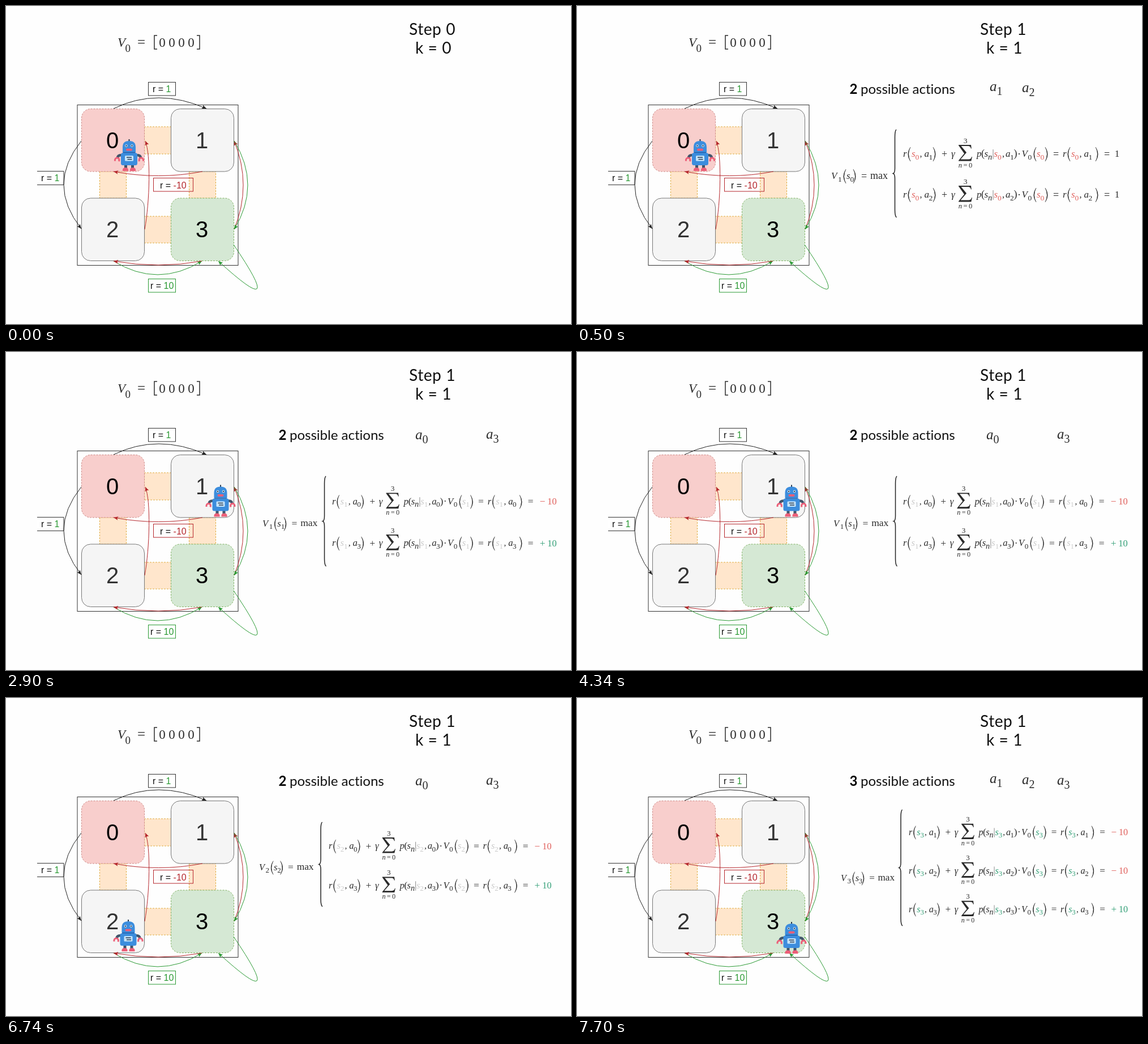
Write an HTML page that moves like this. It is 998 px wide and 561 px high and loops after 8000 ms.

```html
<!DOCTYPE html>
<html lang="en">
<head>
<meta charset="utf-8">
<title>Value iteration on a four-state grid</title>
<style>
  html, body { margin: 0; width: 100%; height: 100%; overflow: hidden; background: #fefefe; }
  svg { display: block; width: 998px; height: 561px; }
  .serif { font-family: "Liberation Serif", "Times New Roman", serif; }
  .sans { font-family: "Liberation Sans", Arial, sans-serif; }
  .geo { font-family: Lato, sans-serif; font-variant-ligatures: none; }
</style>
</head>
<body>
<svg viewBox="0 0 998 561">
  <g id="grid"></g>
  <g id="robot"></g>
  <g id="notes"></g>
</svg>
<script>
const INK = '#2b2b2b', RED = '#e0605c', GREEN = '#35a078', PALE = '#cbcbcb';
const BLACK = '#222', ARC_RED = '#b5272d', ARC_GREEN = '#2b9a34';
const LOOP = 8000;

const scenes = [
  { at: 0, step: 0, robot: [0, 0] },
  { at: 500, step: 1, robot: [0, 0], count: 2, moves: [[1, 729, 150], [2, 786, 152]],
    v: 1, s: 0, tint: RED, scale: 1, lhs: [449, 300], x: 576,
    brace: [561.5, 218, 373], rows: [[261, 1, '1'], [333, 2, '1']] },
  { at: 2900, step: 1, robot: [161.5, -0.5], count: 2, moves: [[0, 723, 154], [3, 848, 153]],
    v: 1, s: 1, tint: PALE, scale: 0.974, lhs: [453, 303], x: 576,
    brace: [562.5, 219, 378], rows: [[264, 0, '−10'], [337.5, 3, '+10']] },
  { at: 5300, step: 1, robot: [-1.5, 156], count: 2, moves: [[0, 723, 154], [3, 848, 153]],
    v: 2, s: 2, tint: PALE, scale: 0.966, lhs: [447, 299], x: 570,
    brace: [556, 219, 368], rows: [[261.5, 0, '−10'], [331, 3, '+10']] },
  { at: 7700, step: 1, robot: [161.5, 160], count: 3,
    moves: [[1, 729, 150], [2, 786, 152], [3, 848, 153]],
    v: 3, s: 3, tint: GREEN, scale: 0.95, lhs: [466, 318], x: 586,
    brace: [572, 197, 402], rows: [[237, 1, '−10'], [305, 2, '−10'], [373, 3, '+10']] }
];

const el = id => document.getElementById(id);
const text = (x, y, str, size, fill = INK, more = '') =>
  `<text x="${x}" y="${y}" font-size="${size}" fill="${fill}" ${more}>${str}</text>`;
const italic = (x, y, str, size, fill) => text(x, y, str, size, fill, 'font-style="italic"');
const mid = (x, y, str, size, fill) => text(x, y, str, size, fill, 'text-anchor="middle"');
const box = (x, y, w, h, fill, stroke, more = '') =>
  `<rect x="${x}" y="${y}" width="${w}" height="${h}" fill="${fill}" stroke="${stroke}" ${more}/>`;
const path = (d, stroke, width = 1, fill = 'none') =>
  `<path d="${d}" stroke="${stroke}" stroke-width="${width}" fill="${fill}"/>`;
const shape = (d, fill) => `<path d="${d}" fill="${fill}"/>`;

// Curve with an arrowhead turned along its last control segment.
function arrow(d, color) {
  const [cx, cy, x, y] = d.match(/[\d.]+/g).slice(-4).map(Number);
  const turn = Math.atan2(y - cy, x - cx) * 180 / Math.PI;
  return path(d, color, 1) +
    `<path d="M0 0L-8 -3.4L-6.4 0L-8 3.4Z" fill="${color}" transform="translate(${x} ${y}) rotate(${turn})"/>`;
}

function reward(x, y, value, color) {
  return text(x, y, `r = <tspan fill="${color}">${value}</tspan>`, 16, '#111');
}

function drawGrid() {
  const dash = 'stroke-dasharray="3 2"';
  const hall = (x, y, w, h) => box(x, y, w, h, '#ffe6cc', '#dfae45', dash);
  const cell = (x, y, n, fill, stroke, ink, more = '') =>
    box(x, y, 111, 110.5, fill, stroke, 'rx="16" ' + more) + mid(x + 54.5, y + 69, n, 40, ink);

  const header = '<g class="serif">' +
    italic(197, 72, 'V', 23) + text(210.5, 81, '0', 19) + mid(239, 72, '=', 25) +
    path('M267 52H262V76H267M337 52H342V76H337', INK, 1.5) +
    [276, 293, 310, 327].map(x => mid(x, 71.5, '0', 23)).join('') + '</g>';

  const cells = box(126, 174.5, 284, 283, 'none', '#333') +
    hall(244, 213, 48, 48) + hall(244, 371, 48, 47) +
    hall(165.5, 292, 47, 47) + hall(323.5, 292, 47, 47) +
    cell(133.5, 181.5, 0, '#f8cecc', '#cf8b88', '#000', dash) +
    cell(291.5, 181.5, 1, '#f5f5f5', '#777', '#333') +
    cell(133.5, 339, 2, '#f5f5f5', '#777', '#333') +
    cell(291.5, 339, 3, '#d5e8d4', '#82b366', '#000', dash);

  const labels = box(251.5, 134.5, 48, 23.5, '#fff', '#333') + reward(259, 152, 1, ARC_GREEN) +
    path('M55 291.5H102V315.5H55', '#333', 1, '#fff') + reward(62, 309, 1, ARC_GREEN) +
    box(260.5, 303.5, 70, 23.5, 'none', ARC_RED) + reward(272, 321.5, '-10', ARC_RED) +
    box(251.5, 481.5, 48, 23.5, '#fff', ARC_GREEN) + reward(255, 499, 10, ARC_GREEN);

  const arcs = arrow('M190 181Q268 143 354 181', BLACK) +
    arrow('M133 238Q71 315 133 393', BLACK) +
    arrow('M347 292Q270 307 190 292', ARC_RED) +
    arrow('M245 394C254 345 256 262 246 238', ARC_RED) +
    arrow('M403 394Q435 316 403 238', ARC_RED) +
    arrow('M403 238Q451 316 403 394', ARC_GREEN) +
    arrow('M190 450Q268 498 346 450', ARC_GREEN) +
    arrow('M346 450Q270 464 190 450', ARC_RED) +
    arrow('M402 421Q498 562 375 450', ARC_GREEN);

  el('grid').innerHTML = header + `<g class="sans">${cells + labels}</g>` + arcs;
}

function drawRobot() {
  const blue = '#3c8ddd', dark = '#41556b', pink = '#ec5f78';
  const side =
    path('M-14 263Q-20 263 -20.5 268', dark, 4.5) +
    path('M-25 273.5Q-25.5 267.5 -20.5 268Q-16.5 269 -18 274', pink, 3) +
    box(-8.5, 280, 5, 6, dark, 'none') +
    shape('M-11.5 291V288.5Q-11 285 -6.5 285Q-2 285 -1.5 288.5V291Z', pink);
  const eye = x => `<circle cx="${x}" cy="246.5" r="2.2" fill="#dff1ff"/>` +
    `<circle cx="${x}" cy="246.5" r="1.2" fill="#27384d"/>`;
  el('robot').innerHTML = side + `<g transform="scale(-1 1)">${side}</g>` +
    path('M0 235V241', '#27384d', 2) +
    shape('M-11.5 258V249Q-11.5 238 0 238Q11.5 238 11.5 249V258Z', blue) +
    box(-14.5, 259, 29, 22, blue, 'none', 'rx="3.5"') +
    path('M-11 258.5H11', '#1f5ea8', 1.4) + eye(-5) + eye(5) +
    box(-5.5, 251.5, 11, 4, pink, 'none', 'rx="2"') +
    box(-7.5, 264, 15, 9.5, '#c4e4fb', 'none', 'rx="1.5"') +
    path('M-4.5 267H4.5M-3 270.5H5', '#27384d', 1.4);
}

const BASE = 5;
// Tall thin bracket; dir is 1 for "(" and -1 for ")".
const paren = (x, dir) =>
  shape(`M${x + 3 * dir} -12Q${x - 5.8 * dir} 0.5 ${x + 3 * dir} 13Q${x - 3 * dir} 0.5 ${x + 3 * dir} -12Z`, INK) +
  path(`M${x + 3 * dir} -12Q${x - 4.4 * dir} 0.5 ${x + 3 * dir} 13`, INK, 0.7);
const sub = (x, n, fill) => text(x, 9.5, n, 13.5, fill);
const action = (x, n) => italic(x, BASE, 'a', 17) + sub(x + 8, n);
const state = (x, n, fill) => italic(x, BASE, 's', 17, fill) + sub(x + 6.5, n, fill);
const comma = x => text(x, BASE, ',', 16);
const sign = (x, c, fill) => mid(x, BASE + 0.5, c, 18, fill);
const sigma = shape('M98 -16H120L120.8 -9.5H119.8Q119 -14 115 -14H102.5L112 -2.5L101.5 9.5' +
  'H115.5Q120 9.5 121 5H122L120.3 12.5H98V11.5L108 -0.8L98 -15Z', INK);
const place = (x, y, scale, body) =>
  `<g class="serif" transform="translate(${x} ${y}) scale(${scale})">${body}</g>`;

function formula(s, a, result, tint) {
  const pay = (x, gap) => italic(x, BASE, 'r', 17) + paren(x + 10, 1) + state(x + 15, s, tint) +
    comma(x + 29.5) + action(x + 37.5, a) + paren(x + 56 + gap, -1);
  const big = result.length > 1;
  const color = !big ? INK : result[0] === '+' ? GREEN : RED;
  return pay(0, 0) + sign(73, '+') + italic(85, BASE, 'γ', 17) +
    sigma + mid(110, -19.5, '3', 13.5) +
    mid(110, 24, '<tspan font-style="italic">n</tspan>\u2009=\u20090', 12.5) +
    italic(130, BASE, 'p', 17) + text(138, BASE, '(', 18) + italic(143.5, BASE, 's', 17) +
    italic(150, 9.5, 'n', 14.5) + path('M159 -8V9', '#777', 0.9) +
    state(160.5, s, tint) + comma(175) + action(181, a) + text(195.5, BASE, ')', 18) +
    sign(205, '·') + italic(209.5, BASE, 'V', 17) + sub(220.5, 0) +
    paren(232, 1) + state(236, s, tint) + paren(254, -1) + sign(270, '=') +
    pay(282, 5) + sign(360, '=') +
    (big ? sign(381.5, result[0], color) + text(390.5, BASE + 0.5, result.slice(1), 17, color)
         : mid(378, BASE, result, 17));
}

function brace([x, top, end]) {
  const c = (top + end) / 2;
  return path(`M${x + 2.5} ${top}Q${x} ${top + 2} ${x} ${top + 13}V${c - 9}Q${x} ${c - 1} ${x - 3} ${c}` +
    `Q${x} ${c + 1} ${x} ${c + 9}V${end - 13}Q${x} ${end - 2} ${x + 3} ${end}`, BLACK, 1.5);
}

function notes(sc) {
  const spaced = 'letter-spacing="0.6"';
  let out = '<g class="geo">' + text(712, 51, 'Step ' + sc.step, 28, '#111', spaced) +
    text(723, 84, 'k = ' + sc.step, 28, '#111', spaced);
  if (!sc.rows) return out + '</g>';
  out += text(481.5, 154.5, sc.count, 24, '#000', 'font-weight="700"') +
    text(501, 154.5, 'possible actions', 24, '#111') + '</g>';

  out += '<g class="serif">' + sc.moves.map(([n, x, y]) =>
    italic(x, y, 'a', 25) + text(x + 12.5, y + 7, n, 20)).join('') + '</g>';

  const [lx, ly] = sc.lhs;
  out += place(lx, ly, sc.scale, italic(0, BASE, 'V', 17) + sub(12, sc.v) + paren(23, 1) +
    state(27, sc.s) + paren(42, -1) + sign(58, '=') + text(69, BASE - 0.5, 'max', 18));
  out += brace(sc.brace);
  for (const [y, a, result] of sc.rows)
    out += place(sc.x, y, sc.scale, formula(sc.s, a, result, sc.tint));
  return out;
}

let shown = null;
const start = performance.now();

function render(ms) {
  const t = ms % LOOP;
  const sc = scenes.filter(s => s.at <= t).pop() || scenes[0];
  if (sc === shown) return;
  shown = sc;
  el('notes').innerHTML = notes(sc);
  el('robot').setAttribute('transform', `translate(${217.5 + sc.robot[0]} ${sc.robot[1]})`);
}

function tick() {
  render(performance.now() - start);
  requestAnimationFrame(tick);
}

drawGrid();
drawRobot();
tick();
</script>
</body>
</html>
```
